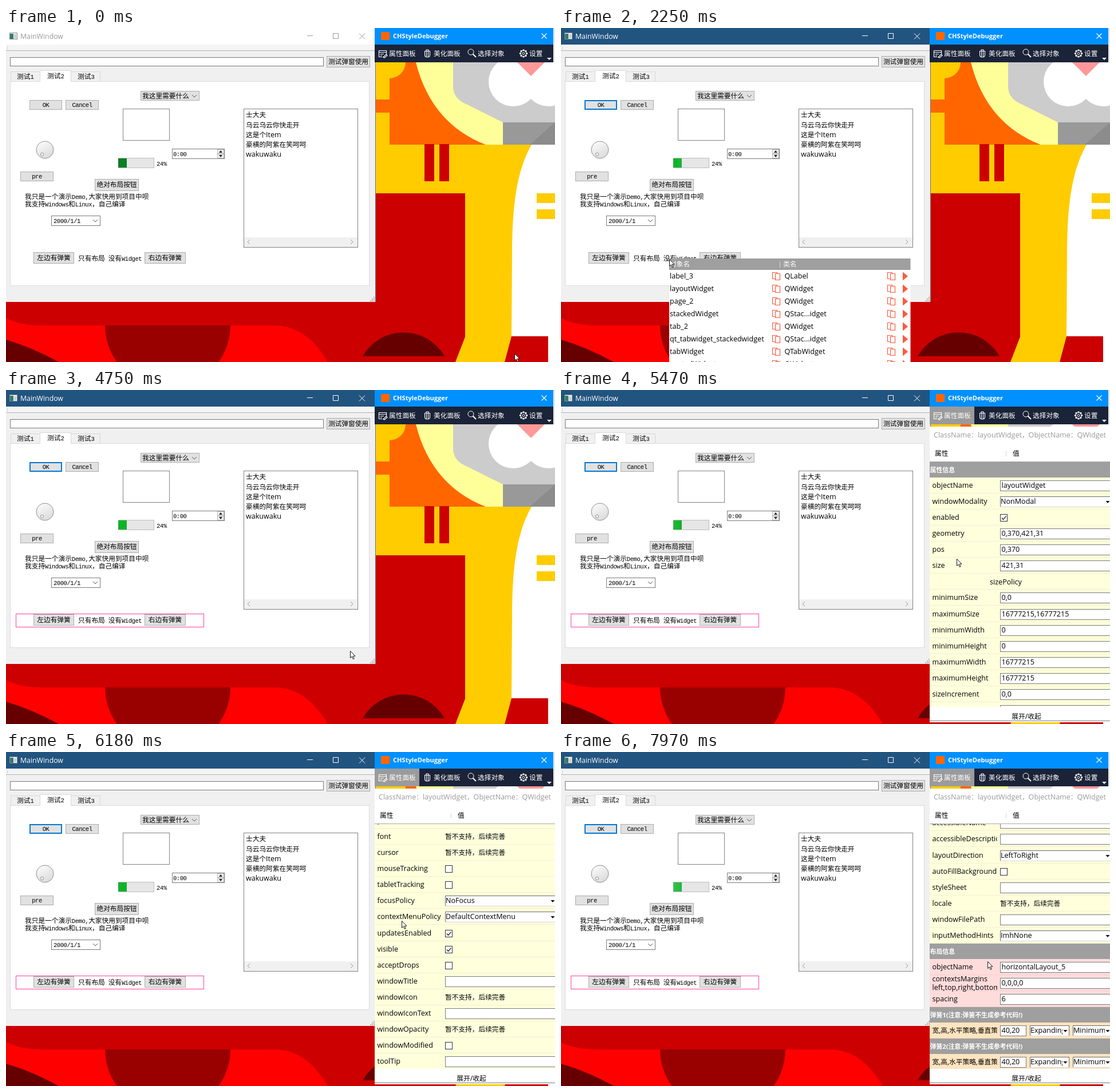
Animation of 959x584 px, one loop 8000 ms. Source, as an HTML page:

```html
<!DOCTYPE html>
<html lang="zh">
<head>
<meta charset="utf-8">
<style>
html,body{margin:0;width:100%;height:100%;overflow:hidden;background:#c00}
svg{display:block;position:absolute;left:0;top:0}
text{white-space:pre}
.ui{font-family:"Open Sans","Noto Sans",sans-serif;font-size:12.55px}
.cj{font-family:"Noto Sans CJK SC","Noto Sans CJK",sans-serif;font-size:11.7px;letter-spacing:0}
.sim{font-family:"Liberation Mono",monospace;font-size:10.6px;letter-spacing:-.5px}
.bold{font-family:"Open Sans",sans-serif;font-size:11.1px;font-weight:700}
.bold .cj{font-size:10.9px}
.cap{font-family:"Open Sans",sans-serif;font-size:12.3px}
</style>
</head>
<body>
<svg id="stage" width="959" height="584" viewBox="0 0 959 584"></svg>
<script>
const LOOP = 8000, ROW = 28.07, NOTCH = 46.75, MAX_SCROLL = 997;
const PICK = 920, POPUP = 2170, CLOSE = 4690, PANEL = 4760;

// drawing helpers
const rect = (x, y, w, h, fill, stroke, extra = '') =>
  `<rect x="${x}" y="${y}" width="${w}" height="${h}" fill="${fill}"${stroke ? ` stroke="${stroke}"` : ''} ${extra}/>`;
const box = (x1, y1, x2, y2, fill, stroke, extra) =>
  rect(x1 + .5, y1 + .5, x2 - x1 - 1, y2 - y1 - 1, fill, stroke, extra);
const path = (d, fill = 'none', stroke = 'none', w = 1) =>
  `<path d="${d}" fill="${fill}" stroke="${stroke}" stroke-width="${w}"/>`;
const circle = (x, y, r, fill, stroke = 'none') =>
  `<circle cx="${x}" cy="${y}" r="${r}" fill="${fill}" stroke="${stroke}"/>`;
const group = (id, body) => `<g id="${id}">${body}</g>`;

// y is the middle of the line; wide characters get their own size
function text(x, y, s, fill = '#000', cls = 'ui', anchor = 'start') {
  const runs = s.replace(/&/g, '&amp;').replace(/[\u2e80-\uffef]+/g, m => `<tspan class="cj">${m}</tspan>`);
  const dy = cls === 'sim' ? 3.9 : 4.4;
  return `<text class="${cls}" x="${x}" y="${y + dy}" fill="${fill}" text-anchor="${anchor}">${runs}</text>`;
}
const sim = (x, y, s, anchor) => text(x, y, s, '#000', 'sim', anchor);
const button = (x1, y1, x2, y2, s) =>
  box(x1, y1, x2, y2, '#e1e1e1', '#adadad') + sim((x1 + x2) / 2, (y1 + y2) / 2, s, 'middle');
const chevron = (x, y) => path(`M${x - 4} ${y - 2}l4 4l4 -4`, 'none', '#555');

function wallpaper() {
  return rect(0, 0, 959, 584, '#fc0')
    + path('M670 60H840V204H670Z M645 125H670V148H645Z', '#f60')
    + path('M645 60H698A28 28 0 0 1 670 88V125H645Z', '#fc0')
    + path('M716 60C732 125 770 178 838 204H868V60Z', '#ff9')
    + path('M781 60V102C781 117 789 127 806 134L868 165H959V60Z', '#ccc')
    + rect(868, 165, 91, 39, '#999') + path('M915 204L959 165V204Z', '#8c8c8c')
    + circle(886, 94, 43, '#fff') + circle(948, 94, 43, '#fff')
    + path('M893 60H941L917 84Z', '#f99')
    + rect(731, 203, 17, 65, '#c00') + rect(757, 203, 17, 65, '#c00')
    + path('M918 204C892 250 884 310 884 400L883 539L871 584H959V204Z', '#fff')
    + rect(927, 289, 32, 17, '#fc0') + rect(927, 317, 32, 17, '#fc0')
    + path('M883 539H947V584H871Z', '#c00')
    + path('M0 479H645V289H802V540L785 584H0Z', '#c00')
    + path('M0 507Q24 520 60 520H468C510 520 540 546 562 584H0Z', '#f00')
    + path('M173 520H392A109.5 109.5 0 0 1 173 520Z', '#900')
    + path('M0 545Q45 558 92 584H0Z', '#600')
    + path('M623 574A82 82 0 0 1 766 574Z', '#600');
}

function mainWindow() {
  const items = ['士大夫', '乌云乌云你快走开', '这是个Item', '豪横的阿紫在笑呵呵', 'wakuwaku'];
  let s = rect(0, 0, 645, 479, '#f0f0f0')
    + `<rect id="bar" width="645" height="29"/>`
    + box(6, 8, 20, 20, '#f4f4f4', '#8a8a8a') + rect(7, 10, 6, 9, '#2f7f6c') + rect(14, 11, 4, 7, '#c8d0d0')
    + `<g id="caption">` + text(25, 14.5, 'MainWindow', 'currentColor', 'cap')
    + path('M526 13.5H536M571.5 9.5H580.5V18.5H571.5ZM617 9.5l10 10m0 -10l-10 10', 'none', 'currentColor') + '</g>'
    + rect(0, 29, 645, 10, '#f5f5f5') + rect(0, 39, 645, 1, '#b2b2b2')
    + rect(2, 33, 1, 1, '#888') + rect(2, 36, 1, 1, '#888')
    + box(7, 51, 555, 67, '#fff', '#7a7a7a')
    + button(560, 49, 636, 69, '测试弹窗使用')
    + box(7, 93, 635, 451, '#fff', '#dcdcdc')
    + box(8, 76, 60, 94, '#f0f0f0', '#d9d9d9') + box(113, 76, 165, 94, '#f0f0f0', '#d9d9d9')
    + path('M59.5 94V74.5H113.5V94', '#fff', '#d9d9d9')
    + sim(19, 85, '测试1') + sim(72, 84, '测试2') + sim(125, 85, '测试3')
    + button(41, 126, 98, 143, 'OK')
    + rect(42, 127, 55, 15, 'none', '#0078d7', 'id="focus" stroke-width="2"')
    + button(104, 126, 162, 143, 'Cancel') + button(25, 251, 83, 268, 'pre')
    + button(155, 264, 232, 285, '绝对布局按钮')
    + button(48, 392, 119, 412, '左边有弹簧') + button(242, 392, 314, 412, '右边有弹簧')
    + sim(126, 403, '只有布局 没有Widget')
    + box(235, 110, 338, 127, '#e1e1e1', '#adadad') + sim(238, 119, '我这里需要什么') + chevron(329, 119)
    + box(204, 141, 286, 197, '#fff', '#828282')
    + box(290, 211, 382, 229, '#fff', '#7a7a7a') + sim(292, 220.5, '0:00')
    + box(369, 212, 381, 220, '#f0f0f0', '#bbb') + box(369, 220, 381, 228, '#f0f0f0', '#bbb')
    + path('M372 218l3 -4l3 4ZM372 222l3 4l3 -4Z', '#222')
    + box(196, 227, 259, 245, '#e6e6e6', '#bcbcbc')
    + `<rect id="chunk" x="196" y="228" width="15" height="16"/>`
    + `<g clip-path="url(#chunkClip)"><rect id="sheen" y="228" width="93" height="16" fill="url(#glow)"/></g>`
    + sim(263, 237, '24%')
    + circle(68, 213, 15, 'url(#knob)', '#8f8f8f') + circle(63, 221, 2.8, '#eee', '#999')
    + sim(33, 295.5, '我只是一个演示Demo,大家快用到项目中呗')
    + sim(33, 308.5, '我支持Windows和Linux，自己编译')
    + box(79, 328, 165, 346, '#fff', '#7a7a7a') + sim(83, 337.5, '2000/1/1') + chevron(156, 337)
    + box(415, 141, 615, 384, '#fff', '#828282') + rect(416, 366, 198, 17, '#f0f0f0')
    + path('M426 370l-4 4l4 4M602 370l4 4l-4 4', 'none', '#999')
    + items.map((t, i) => text(419, 152 + i * 17.1, t)).join('')
    + rect(645, 29, 1, 450, '#6d6d6d');
  for (let i = 0; i < 3; i++)
    for (let j = 0; j <= i; j++) s += rect(642 - 3 * j, 470 + 3 * i, 2, 2, '#b0b0b0');
  return s;
}

const propIcon = 'M651.5 39.5H664.5V46M651.5 39.5V50.5H657M651.5 42.5H664.5M654 45.5H660M654 48H657M659 51l5 -5l2 2l-5 4Z';
function toolWindow() {
  let gear = '';
  for (let i = 0; i < 8; i++) gear += rect(902.5, 37.5, 3, 2.5, '#fff', '', `transform="rotate(${i * 45} 904 44.5)"`);
  return rect(956, 0, 3, 60, '#e8e8e8') + rect(644, 0, 312, 29, '#0090ff') + rect(644, 29, 312, 31, '#1b2338')
    + rect(655, 7, 15, 14, '#f60')
    + text(676, 14, 'CHStyleDebugger', '#fff', 'bold')
    + path('M935.5 9.5l9 9m0 -9l-9 9', 'none', '#fff', 1.2)
    + rect(644, 29, 78, 31, '#9b9b9b', '', 'id="propOn"') + rect(800, 29, 78, 31, '#9b9b9b', '', 'id="pickOn"')
    + path(propIcon, 'none', '#fff', 1.2)
    + path('M731.5 40.5H740.5V47Q740.5 51 736 51Q731.5 51 731.5 47ZM734 40V38H738V40M734.5 41V50M737.5 41V50', 'none', '#fff', 1.1)
    + circle(812, 42, 5, 'none', '#fff') + path('M815.5 45.5L821 51', 'none', '#fff', 2)
    + gear + circle(904, 44.5, 5, 'none', '#fff') + circle(904, 44.5, 2, 'none', '#fff')
    + text(669, 45, '属性面板', '#fff') + text(747, 45, '美化面板', '#fff')
    + text(824, 45, '选择对象', '#fff') + text(914, 45, '设置', '#fff')
    + path('M945 52H953L949 56Z', '#fff');
}

function popup() {
  const rows = ['label_3 QLabel', 'layoutWidget QWidget', 'page_2 QWidget', 'stackedWidget QStac...idget', 'tab_2 QWidget',
    'qt_tabwidget_stackedwidget QStac...idget', 'tabWidget QTabWidget', 'centralWidget QWidget'];
  const copy = (x, y) => path(`M${x + 5} ${y + 4.5}H${x + .5}V${y - 6.5}H${x + 8.5}V${y - 4.5}M${x + 5.5} ${y - 4.5}H${x + 13.5}V${y + 6.5}H${x + 5.5}Z`, 'none', '#ff5a3c', 1.2);
  let s = rect(189, 403, 421.5, 181, '#fff') + rect(189, 403, 421.5, 20, '#9f9f9f')
    + text(190, 413, '对象名', '#fff') + text(388, 413, '类名', '#fff') + rect(382, 408, 1, 11, '#d8d8d8');
  rows.forEach((r, i) => {
    const y = Math.round(434.4 + i * 21.9), [name, type] = r.split(' ');
    s += text(190, y, name) + text(390.5, y, type) + copy(369, y) + copy(570, y) + path(`M597 ${y - 7.5}l9 7.5l-9 7.5Z`, '#ff5a3c');
  });
  return s;
}

// "=x" edit, "~x" combo, "0"/"1" check box, "-" unsupported, "*" group
const props = `objectName =layoutWidget|windowModality ~NonModal|enabled 1|geometry =0,370,421,31|pos =0,370|size =421,31
sizePolicy *|minimumSize =0,0|maximumSize =16777215,16777215|minimumWidth =0|minimumHeight =0|maximumWidth =16777215
maximumHeight =16777215|sizeIncrement =0,0|baseSize =0,0|palette -|font -|cursor -|mouseTracking 0|tabletTracking 0
focusPolicy ~NoFocus|contextMenuPolicy ~DefaultContextMenu|updatesEnabled 1|visible 1|acceptDrops 0|windowTitle =
windowIcon -|windowIconText =|windowOpacity -|windowModified 0|toolTip =|toolTipDuration =-1|statusTip =|whatsThis =
accessibleName =|accessibleDescription =|layoutDirection ~LeftToRight|autoFillBackground 0|styleSheet =|locale -
windowFilePath =|inputMethodHints ~ImhNone`.split(/[|\n]/);

const edit = (x1, x2, y, s, extra) => box(x1, y - 9, x2, y + 10, '#fff', '#7a7a7a', extra) + text(x1 + 2.5, y, s);
const combo = (x1, x2, y, s, clip) => rect(x1, y - 9, x2 - x1, 19, '#fff')
  + path(`M${x1 + .5} ${y + 9}V${y - 8.5}H${x2}`, 'none', '#696969') + path(`M${x1} ${y + 9.5}H${x2}`, 'none', '#d5d5d5')
  + `<g${clip ? ' clip-path="url(#comboClip)"' : ''}>` + text(x1 + 1, y, s) + '</g>'
  + rect(x2 - 12, y - 8, 12, 16, '#fff') + path(`M${x2 - 10.5} ${y - 1}h7l-3.5 4Z`, '#111')
  + (x2 < 950 ? path(`M${x2 - .5} ${y - 9}V${y + 9}`, 'none', '#696969') : '');

function value(v, y) {
  const rest = v.slice(1);
  switch (v[0]) {
    case '=': return edit(767, 965, y, rest);
    case '~': return combo(767, 962, y, rest);
    case '-': return text(767, y, '暂不支持，后续完善');
    case '*': return '';
  }
  return box(767, y - 6, 780, y + 7, '#fff', '#333') + (v === '1' ? path(`M770 ${y + .5}l2.5 3l5 -6`, 'none', '#222', 1.2) : '');
}

function sheet() {
  let y = 126, s = '', labels = '';
  const head = t => {
    const top = Math.round(y);
    s += rect(644, top, 315, 27, '#9f9f9f') + text(644.5, top + 14, t, '#fff', 'bold');
    y += 27;
  };
  const line = (fill, edge, draw) => {
    const top = Math.round(y);
    s += rect(644, top, 315, 29, fill) + rect(644, top + 27, 315, 1, edge);
    draw(top + 14);
    y += ROW;
  };
  const label = (m, t) => labels += text(648.5, m, t);
  head('属性信息');
  props.forEach(p => line('#ffffdc', '#f1f0d2', m => {
    const [name, v] = p.split(' ');
    if (v === '*') s += text(777, m + 1, name, '#000', 'ui', 'middle');
    else label(m, name);
    s += value(v, m);
  }));
  head('布局信息');
  const pink = draw => line('#ffdcdc', '#f3d0d0', draw);
  pink(m => { label(m, 'objectName'); s += edit(767, 965, m, 'horizontalLayout_5', 'id="layoutName"'); });
  pink(m => { label(m - 7.5, 'contextsMargins'); label(m + 7.5, 'left,top,right,bottom'); s += edit(767, 965, m, '0,0,0,0'); });
  pink(m => { label(m, 'spacing'); s += edit(767, 965, m, '6'); });
  for (const n of [1, 2]) {
    head(`弹簧${n}(注意:弹簧不生成参考代码!)`);
    line('#ffe4c0', '#f5d9b4', m => {
      label(m, '宽,高,水平策略,垂直策略');
      s += edit(767, 813, m, '40,20') + combo(819, 888, m, 'Expanding', true) + combo(894, 962, m, 'Minimum');
    });
  }
  return s + `<g clip-path="url(#labelClip)">${labels}</g>`;
}

function panel() {
  return rect(644, 64, 315, 517, '#fff')
    + text(651, 79, 'ClassName：layoutWidget，ObjectName：QWidget', '#9a9a9a')
    + text(653, 111, '属性') + text(789, 111, '值') + rect(777, 107, 1, 9, '#d5d5d5')
    + `<g clip-path="url(#listClip)">${group('sheet', sheet())}</g>` + rect(644, 125, 315, 1, '#a8a8a8')
    + text(813, 571, '展开/收起', '#000', 'ui', 'middle') + rect(644, 578, 315, 1, '#777');
}

const clip = (id, x, y, w, h) => `<clipPath id="${id}">${rect(x, y, w, h, '#000')}</clipPath>`;
document.getElementById('stage').innerHTML = `<defs>
<linearGradient id="glow"><stop offset="0" stop-color="#fff" stop-opacity="0"/><stop offset=".5" stop-color="#fff" stop-opacity=".3"/><stop offset="1" stop-color="#fff" stop-opacity="0"/></linearGradient>
<linearGradient id="knob" x2=".6" y2="1"><stop offset="0" stop-color="#fff"/><stop offset="1" stop-color="#dcdcdc"/></linearGradient>`
  + clip('chunkClip', 196, 228, 15, 16) + clip('listClip', 644, 126, 315, 428)
  + clip('labelClip', 644, 0, 118, 2000) + clip('comboClip', 819, 0, 58, 2000) + '</defs>'
  + wallpaper() + mainWindow() + rect(17.5, 391.5, 328, 23, 'none', '#ff3fa4', 'id="outline"')
  + group('panel', panel()) + toolWindow() + group('popup', popup())
  + group('cursor', path('M.5 .5V12.5L3.3 9.9L5.3 14.5L7.2 13.7L5.2 9.2H9Z', '#fff', '#000', .9));

const el = {};
document.querySelectorAll('#stage g[id], #stage rect[id]').forEach(e => el[e.id] = e);

// time, x, y
const moves = [[0, 888, 569], [820, 840, 43], [960, 838, 46], [1700, 185, 358], [2010, 189, 404], [2250, 189, 404],
  [3060, 236, 461], [4150, 236, 461], [4600, 601, 456], [4940, 601, 456], [5400, 691, 295], [7450, 691, 295],
  [7760, 774, 371], [7970, 745, 366]];
// time, wheel notches so far
const wheel = [[5550, 1], [5630, 3], [5710, 4], [5780, 6], [5860, 7], [5940, 9], [6180, 10], [6260, 12], [6400, 13],
  [6480, 15], [6640, 16], [6720, 17], [6800, 18], [6880, 19], [6960, 21], [7120, 22]];

function pointer(t) {
  let a = moves[0];
  for (const b of moves) {
    if (t < b[0]) {
      const u = (t - a[0]) / (b[0] - a[0]), k = u * u * (3 - 2 * u);
      return [1, 2].map(i => Math.round(a[i] + (b[i] - a[i]) * k));
    }
    a = b;
  }
  return [a[1], a[2]];
}
const show = (e, on) => e.setAttribute('visibility', on ? 'visible' : 'hidden');

function draw(t) {
  const active = t >= POPUP, [x, y] = pointer(t);
  el.bar.setAttribute('fill', active ? '#225480' : '#fff');
  el.caption.setAttribute('color', active ? '#fff' : '#999');
  show(el.focus, active);
  show(el.pickOn, t >= PICK && t < POPUP);
  show(el.popup, active && t < CLOSE);
  show(el.outline, active && (y >= 445 || t >= CLOSE));
  show(el.panel, t >= PANEL);
  show(el.propOn, t >= PANEL);

  // the shine crosses the progress chunk, then rests
  const phase = (t - 550 + 1215) % 1215, shining = t >= 550 && phase < 530;
  el.chunk.setAttribute('fill', t < 550 ? '#0c7d26' : '#10b22a');
  el.sheen.setAttribute('x', 103 + 108 * phase / 530);
  show(el.sheen, shining);

  let n = 0;
  for (const [at, count] of wheel) if (t >= at) n = count;
  el.sheet.setAttribute('transform', `translate(0 ${-Math.min(MAX_SCROLL, Math.round(n * NOTCH))})`);
  el.layoutName.setAttribute('stroke', t > 7450 && x >= 767 && y >= 366 ? '#171717' : '#7a7a7a');
  el.cursor.setAttribute('transform', `translate(${x} ${y})`);
}

const start = performance.now();
function tick() {
  draw((performance.now() - start) % LOOP);
  requestAnimationFrame(tick);
}
draw(0);
requestAnimationFrame(tick);
</script>
</body>
</html>
```
